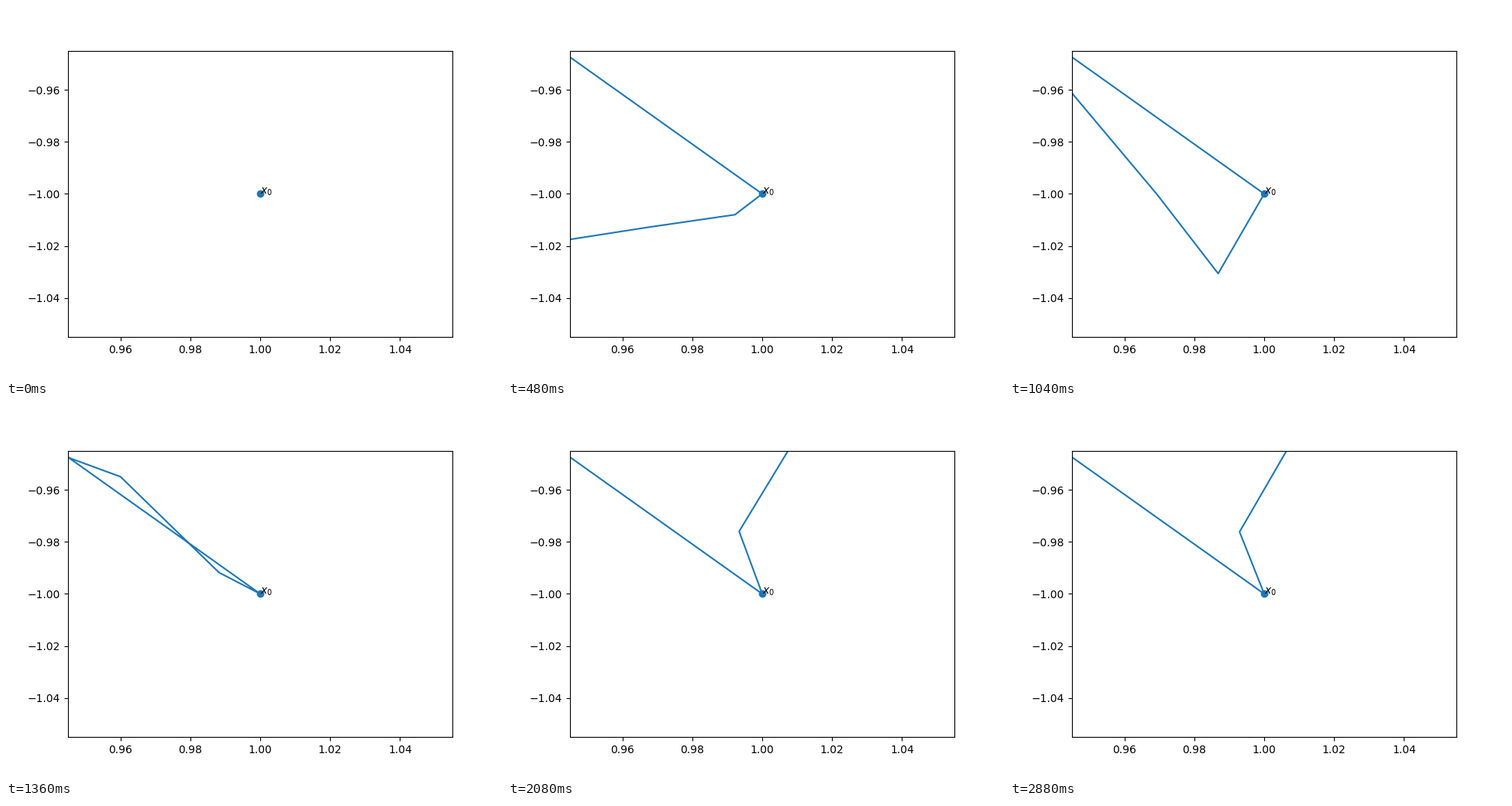
A matplotlib script for the animation above (4120 ms loop, 640x480 px).

```python
import numpy as np
import matplotlib.pyplot as plt
from matplotlib.animation import FuncAnimation

TICK_MS = 40
LOOP_MS = 4120
TICKS_PER_STEP = 2
LAST_STEP = 36
START = np.array([1.0, -1.0])
BLUE = "C0"

# Path points after the start, as offsets from it in thousandths.
SWUNG = [(-6.6, 24), (11.5, 64), (0, 160)]
SETTLED = [(-7.05, 23.8), (10.3, 64), (0, 160)]
GOAL = (-110, 105)
POSES = {
    1: SWUNG,
    6: [(-7.8, -8), (-32, -12.7), (-90, -24.8)],
    10: [(-14.2, -59.7), (-23.5, -34.4), (-70.6, 74)],
    17: [(-11.8, 8.2), (-40, 45), (-80, 64.7)],
    22: [(-9.3, 19.8), (-36.6, 73), (-60, 110)],
    26: SWUNG,
}
STEPS = list(POSES)


def mix(a, b, u):
    return (1 - u) * np.array(a) + u * np.array(b)


def pose_at(step):
    """Blend neighbouring poses, then decay towards the settled one."""
    if step >= STEPS[-1]:
        return mix(SETTLED, SWUNG, 0.5 ** (step - STEPS[-1]))
    i = np.searchsorted(STEPS, step, side="right") - 1
    a, b = STEPS[i:i + 2]
    return mix(POSES[a], POSES[b], (step - a) / (b - a))


def path_at(step):
    """Closed path: start, bent arm, goal and straight back."""
    points = np.vstack([pose_at(step), GOAL])
    return np.vstack([START, START + points / 1000, START])


fig, ax = plt.subplots(figsize=(6.4, 4.8), dpi=100)
ax.plot(*START, "o", color=BLUE)
ax.set_xlim(ax.get_xlim())
ax.set_ylim(ax.get_ylim())
ax.text(*START, "$x_0$")
line, = ax.plot([], [], color=BLUE, lw=1.5)


def update(tick):
    step = min(tick // TICKS_PER_STEP, LAST_STEP)
    if step == 0:
        line.set_data([], [])
    else:
        line.set_data(*path_at(step).T)
    return line,


anim = FuncAnimation(fig, update, frames=LOOP_MS // TICK_MS,
                     interval=TICK_MS, repeat=True, repeat_delay=0)
plt.show()
```
